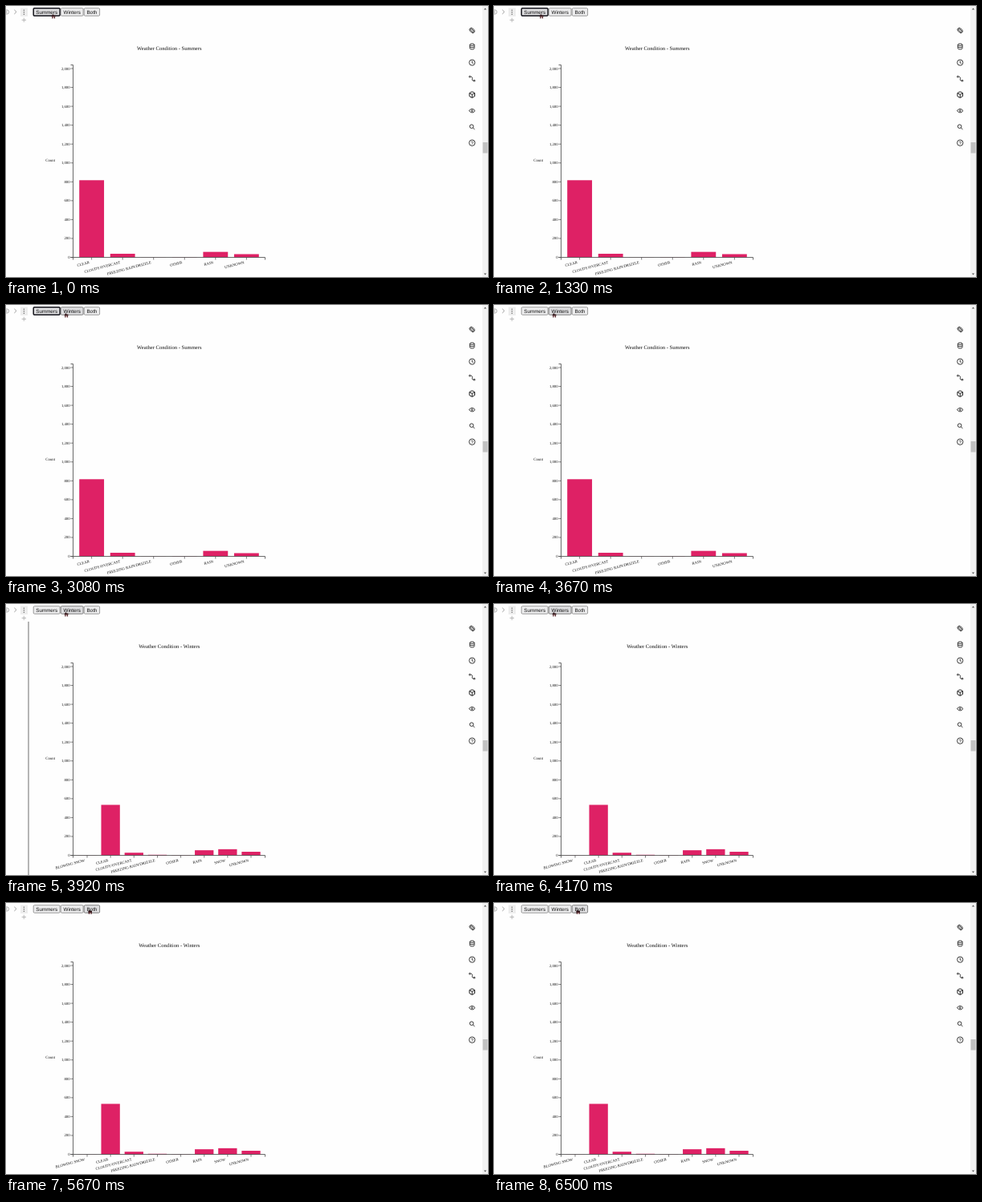
Animation, 600 px wide and 338 px high, one loop 8000 ms. Source, as an HTML page with a canvas:

```html
<!DOCTYPE html>
<html lang="en">
<head>
<meta charset="utf-8">
<title>Weather Condition</title>
<style>
html, body { margin: 0; width: 100%; height: 100%; overflow: hidden; background: #fefefe; }
canvas { display: block; width: 600px; height: 338px; }
</style>
</head>
<body>
<canvas id="stage" width="600" height="338"></canvas>
<script>
const ctx = document.getElementById('stage').getContext('2d');
const LOOP = 8000;
const SERIF = '"Liberation Serif", serif';
const SANS = '"Liberation Sans", sans-serif';
const AXIS = { left: 83.5, right: 322.5, top: 73.5, bottom: 313.5, step: 23.55 };

const CHARTS = {
  Summers: [['CLEAR', 817], ['CLOUDY/OVERCAST', 38], ['FREEZING RAIN/DRIZZLE', 1],
    ['OTHER', 2], ['RAIN', 58], ['UNKNOWN', 34]],
  Winters: [['BLOWING SNOW', 1], ['CLEAR', 535], ['CLOUDY/OVERCAST', 28],
    ['FREEZING RAIN/DRIZZLE', 6], ['OTHER', 2], ['RAIN', 54], ['SNOW', 65], ['UNKNOWN', 38]]
};

const BUTTONS = [
  { name: 'Summers', x: 34, w: 33.5 },
  { name: 'Winters', x: 68, w: 28.5 },
  { name: 'Both', x: 97, w: 20 }
];

// Start time, then the pointer position
const POINTER = [[0, 59, 13], [2830, 71, 13], [3080, 75, 13], [4420, 89, 11], [4670, 100, 11], [4830, 104.6, 11.4]];

function text(str, x, y, size, align, family = SERIF, color = '#111') {
  ctx.font = `${size}px ${family}`;
  ctx.textAlign = align;
  ctx.fillStyle = color;
  ctx.fillText(str, x, y);
}

function line(points, color = '#333', width = 1) {
  ctx.strokeStyle = color;
  ctx.lineWidth = width;
  ctx.beginPath();
  points.forEach(([x, y], i) => i ? ctx.lineTo(x, y) : ctx.moveTo(x, y));
  ctx.stroke();
}

function ellipse(x, y, rx, ry = rx, from = 0, to = Math.PI * 2) {
  ctx.beginPath();
  ctx.ellipse(x, y, rx, ry, 0, from, to);
  ctx.stroke();
}

function rect(x, y, w, h, color) {
  ctx.fillStyle = color;
  ctx.fillRect(x, y, w, h);
}

function drawChart(season) {
  const { left, right, top, bottom, step } = AXIS;
  const rows = CHARTS[season];
  const band = (right - left) / (rows.length + 0.2);

  text(`Weather Condition - ${season}`, 203.3, 55.4, 6.61, 'center');
  text('Count', 49.3, 194, 4.85, 'left');

  rows.forEach(([label, value], i) => {
    const x = left + band * (i + 0.2);
    const mid = x + band * 0.4;
    const h = value / 200 * step;
    rect(x, bottom - h, band * 0.8, h, '#de2165');
    line([[mid, bottom], [mid, bottom + 3]], '#444', 0.7);
    ctx.save();
    ctx.translate(mid - 2.6, 321);
    ctx.rotate(-Math.PI / 12);
    text(label, 0, 0, 4.75, 'right');
    ctx.restore();
  });

  line([[left - 3, top], [left, top], [left, bottom], [left - 3, bottom]], '#444', 0.8);
  line([[left, bottom + 3], [left, bottom], [right, bottom], [right, bottom + 3]], '#444', 0.8);
  for (let i = 0; i <= 10; i++) {
    const y = bottom - i * step;
    line([[left - 3, y], [left, y]], '#444', 0.7);
    text((i * 200).toLocaleString('en-US'), left - 3.9, y + 1.5, 4.75, 'right');
  }
}

function drawButton({ name, x, w }, focused, hovered) {
  ctx.beginPath();
  ctx.roundRect(x + 0.2, 2.7, w - 0.6, 9.6, 1.2);
  ctx.fillStyle = hovered ? '#dedee0' : '#ededee';
  ctx.fill();
  ctx.strokeStyle = focused ? '#15151c' : hovered ? '#666' : '#858585';
  ctx.lineWidth = focused ? 1.5 : 0.8;
  ctx.stroke();
  text(name, x + w / 2 - 0.1, 9.8, 6.3, 'center', SANS, '#111');
}

function drawLeftTools() {
  rect(18, 2.5, 9, 10.5, '#ededed');
  [4.7, 7.2, 9.7].forEach(y => rect(21.8, y, 1.1, 1.1, '#444'));
  line([[10.3, 4.8], [13, 7.4], [10.3, 10]], '#888', 0.8);
  line([[19.6, 17.5], [25, 17.5]], '#aaa', 0.8);
  line([[22.3, 14.8], [22.3, 20.2]], '#aaa', 0.8);
  ctx.strokeStyle = '#999';
  ctx.lineWidth = 0.8;
  ellipse(1, 7.5, 2.6);
  line([[0, 6.5], [1.5, 7.5], [0, 8.5]], '#999', 0.7);
}

const ICONS = [
  function clip() {
    ctx.rotate(Math.PI / 4);
    for (const [w, h] of [[7, 4.4], [4.5, 1.8]]) {
      ctx.beginPath();
      ctx.roundRect(-w / 2, -h / 2, w, h, h / 2);
      ctx.stroke();
    }
  },
  function database() {
    ellipse(0, -2.3, 2.8, 1.2);
    ellipse(0, 0, 2.8, 1.2, 0, Math.PI);
    ellipse(0, 2.3, 2.8, 1.2, 0, Math.PI);
    line([[-2.8, -2.3], [-2.8, 2.3]], '#222', 0.9);
    line([[2.8, -2.3], [2.8, 2.3]], '#222', 0.9);
  },
  function clock() {
    ellipse(0, 0, 3.6);
    line([[0, -2.2], [0, 0.2], [1.6, 1]], '#222', 0.9);
  },
  function route() {
    ellipse(-2.8, -2.4, 0.9);
    ellipse(2.8, 2.6, 0.9);
    ctx.beginPath();
    ctx.moveTo(-1.8, -2.4);
    ctx.bezierCurveTo(2.5, -2.6, -2, 2.8, 1.8, 2.6);
    ctx.stroke();
  },
  function cube() {
    line([[0, -3.8], [3.3, -2], [3.3, 2], [0, 3.8], [-3.3, 2], [-3.3, -2], [0, -3.8]], '#222', 1);
    line([[-3.3, -2], [0, -0.2], [3.3, -2]], '#222', 1);
    line([[0, -0.2], [0, 3.8]], '#222', 1);
  },
  function eye() {
    ctx.beginPath();
    ctx.moveTo(-3.8, 0);
    ctx.quadraticCurveTo(0, -4.6, 3.8, 0);
    ctx.quadraticCurveTo(0, 4.6, -3.8, 0);
    ctx.stroke();
    ellipse(0, 0, 0.9);
  },
  function search() {
    ellipse(-0.6, -0.5, 2.3);
    line([[1.1, 1.2], [3.2, 3.2]], '#222', 1);
  },
  function help() {
    ellipse(0, 0, 3.7);
    text('?', 0, 2.1, 6, 'center', SANS);
  }
];

function drawRightTools() {
  ICONS.forEach((icon, i) => {
    ctx.save();
    ctx.translate(580.2, 30.5 + i * 20.03);
    ctx.strokeStyle = '#222';
    ctx.lineWidth = 0.9;
    icon();
    ctx.restore();
  });
}

function drawScrollbar() {
  rect(593, 0, 7, 338, '#f2f2f2');
  rect(593.5, 170, 6, 13.5, '#c1c1c1');
  for (const [y, dir] of [[3.4, -1], [334.4, 1]]) {
    ctx.fillStyle = '#555';
    ctx.beginPath();
    ctx.moveTo(594.9, y - dir);
    ctx.lineTo(598.1, y - dir);
    ctx.lineTo(596.5, y + dir);
    ctx.fill();
  }
}

function drawPointer(x, y) {
  rect(x - 1.2, y - 2.5, 1.4, 2, '#2b1518');
  rect(x - 2.2, y - 1.4, 4.6, 2, '#35171b');
  rect(x - 1.8, y + 0.5, 1.3, 2, '#4c2227');
  rect(x + 0.8, y + 0.5, 1.3, 2, '#4c2227');
  rect(x - 0.5, y + 0.5, 1.3, 1.2, '#c98d8d');
}

function draw(t) {
  rect(0, 0, 600, 338, '#fefefe');
  drawLeftTools();
  const hovered = t < 3080 ? '' : t < 4830 ? 'Winters' : 'Both';
  const focused = t < 3670 ? 'Summers' : '';
  BUTTONS.forEach(b => drawButton(b, b.name === focused, b.name === hovered || b.name === focused));
  drawChart(t < 3920 ? 'Summers' : 'Winters');
  if (t >= 3920 && t < 4170) rect(27, 22, 2, 316, '#b5b5b5');
  drawRightTools();
  drawScrollbar();
  const [, x, y] = POINTER.findLast(([start]) => t >= start);
  drawPointer(x, y);
}

ctx.textRendering = 'geometricPrecision';
const startTime = performance.now();
function tick() {
  draw((performance.now() - startTime) % LOOP);
  requestAnimationFrame(tick);
}
tick();
</script>
</body>
</html>
```
